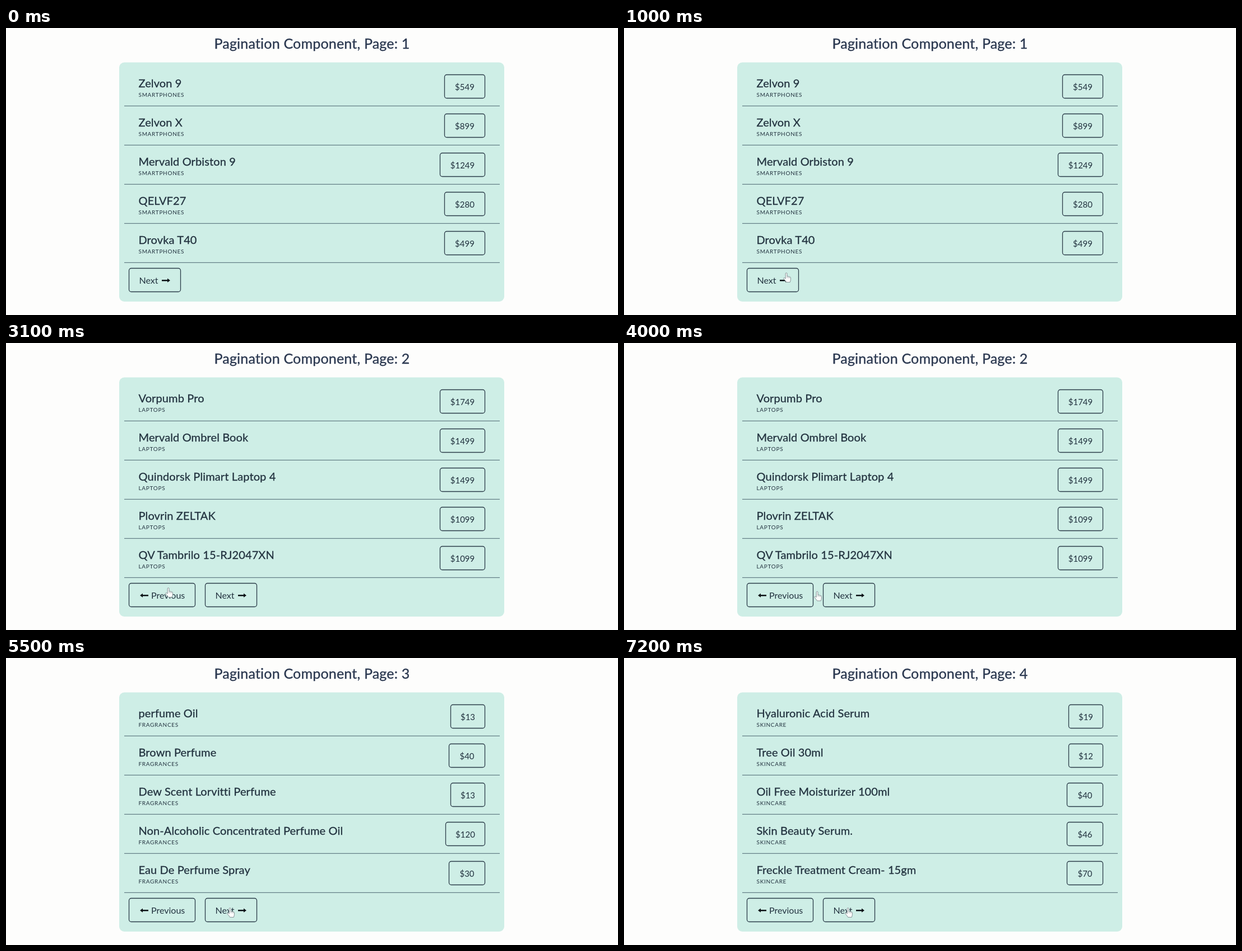
An HTML page that plays this animation: 1092 by 513 pixels, repeating every 8 s.

```html
<!DOCTYPE html>
<html lang="en">
<head>
<meta charset="utf-8">
<title>Pagination Component</title>
<style>
  html, body { margin: 0; width: 100%; height: 100%; overflow: hidden; background: #fdfdfc; }
  svg { display: block; width: 100%; height: 100%; font-family: Lato, "Open Sans", sans-serif; fill: #22323f; }
  .head { font-size: 25px; letter-spacing: .2px; fill: #2b3850; stroke: #2b3850; stroke-width: .35; }
  .name { font-size: 20px; letter-spacing: .12px; stroke: #22323f; stroke-width: .3; }
  .kind { font-size: 10px; letter-spacing: .7px; }
  .price { font-size: 15px; }
  .label { font-size: 16px; }
  .mid { text-anchor: middle; }
  .box { fill: none; stroke: #2b3c49; stroke-width: 1.3; }
  .rule { stroke: #647f86; stroke-width: 1.3; }
  .arrow { fill: #0c1216; }
</style>
</head>
<body>
<svg viewBox="0 0 1092 513">
  <rect x="202" y="61.5" width="687" height="427.5" rx="9" fill="#ceeee6"/>
  <g id="page"></g>
  <g id="hand">
    <path d="M4.2 11V2.2Q4.2 .6 5.6 .6T7 2.2V7Q8.2 6.2 9.2 7.3Q10.4 6.7 11.2 7.9Q13.4 7.6 13.4 9.8V12.5Q13.4 14.5 12.2 17.4H5.6Q4.6 15.2 1 11.4Q.2 10.2 1.3 9.6Q2.6 9.3 4.2 11Z"
      fill="#fcfcfc" stroke="#6c797e" stroke-width=".8" stroke-linejoin="round"/>
    <path d="M7 7V10M9.2 7.6V10.2M11.2 8.2V10.4" stroke="#8a9699" stroke-width=".6"/>
  </g>
</svg>
<script>
const pages = [
  { kind: 'SMARTPHONES', items: [['Zelvon 9', 549], ['Zelvon X', 899], ['Mervald Orbiston 9', 1249], ['QELVF27', 280], ['Drovka T40', 499]] },
  { kind: 'LAPTOPS', items: [['Vorpumb Pro', 1749], ['Mervald Ombrel Book', 1499], ['Quindorsk Plimart Laptop 4', 1499], ['Plovrin ZELTAK', 1099], ['QV Tambrilo 15-RJ2047XN', 1099]] },
  { kind: 'FRAGRANCES', items: [['perfume Oil', 13], ['Brown Perfume', 40], ['Dew Scent Lorvitti Perfume', 13], ['Non-Alcoholic Concentrated Perfume Oil', 120], ['Eau De Perfume Spray', 30]] },
  { kind: 'SKINCARE', items: [['Hyaluronic Acid Serum', 19], ['Tree Oil 30ml', 12], ['Oil Free Moisturizer 100ml', 40], ['Skin Beauty Serum.', 46], ['Freckle Treatment Cream- 15gm', 70]] }
];
const turns = [3100, 5500, 7200];
const LOOP = 8000;
const pageEl = document.getElementById('page');
const hand = document.getElementById('hand');

const text = (cls, x, y, s) => `<text class="${cls}" x="${x}" y="${y}">${s}</text>`;
const box = (x, y, w) => `<rect class="box" x="${x + .5}" y="${y + .5}" width="${w - 1}" height="42" rx="4"/>`;
const arrow = (x, dir) =>
  `<path class="arrow" transform="translate(${x} 451.2) scale(${dir} 1)" d="M-7.5-1.3H2.5V-3.6L7.5 0L2.5 3.6V1.3H-7.5Z"/>`;

// A leading 1 is narrower than the other digits
function priceWidth(price) {
  const s = String(price);
  return Math.round(s[0] === '1' ? 43.3 + 9.3 * s.length : 47.8 + 8.4 * s.length);
}

function row([name, price], i, kind) {
  const y = 70 * i, w = priceWidth(price);
  return text('name', 236.5, y + 105.5, name) +
    text('kind', 236.5, y + 122.5, kind) +
    box(855 - w, y + 83, w) +
    text('price mid', 855 - w / 2, y + 110.7, '$' + price) +
    `<path class="rule" d="M211 ${y + 139.3}H881"/>`;
}

function nextButton(x) {
  return box(x, 429, 93) + text('label', x + 18.5, 457, 'Next') + arrow(x + 66.5, 1);
}

function draw(n) {
  const { kind, items } = pages[n];
  const previous = box(219, 429, 119) + arrow(246.5, -1) + text('label', 259, 457, 'Previous');
  pageEl.innerHTML = text('head mid', 546, 37, 'Pagination Component, Page: ' + (n + 1)) +
    items.map((item, i) => row(item, i, kind)).join('') +
    (n ? previous + nextButton(355) : nextButton(219));
}

const progress = (t, from, to) => Math.min(1, Math.max(0, (t - from) / (to - from)));

// Top left corner of the pointer
function pointer(t) {
  if (t < 3600) {
    const rest = (1 - progress(t, 400, 1000)) ** 2;
    return [284 + 110 * rest, 437 + 40 * rest];
  }
  const p = progress(t, 3600, 4400), bend = Math.sin(Math.PI * p);
  return [284 + 107 * p + 1.5 * bend + (t >= 5500 ? 3 : 0), 437 + 9 * p + 2 * bend];
}

let shown = -1;
const start = performance.now();
function frame(now) {
  const t = Math.floor((Math.max(0, now - start) % LOOP) / 100) * 100;
  const n = turns.filter(at => t >= at).length;
  if (n !== shown) draw(shown = n);
  hand.setAttribute('visibility', t < 500 ? 'hidden' : 'visible');
  hand.setAttribute('transform', `translate(${pointer(t)})`);
  requestAnimationFrame(frame);
}
frame(start);
</script>
</body>
</html>
```
